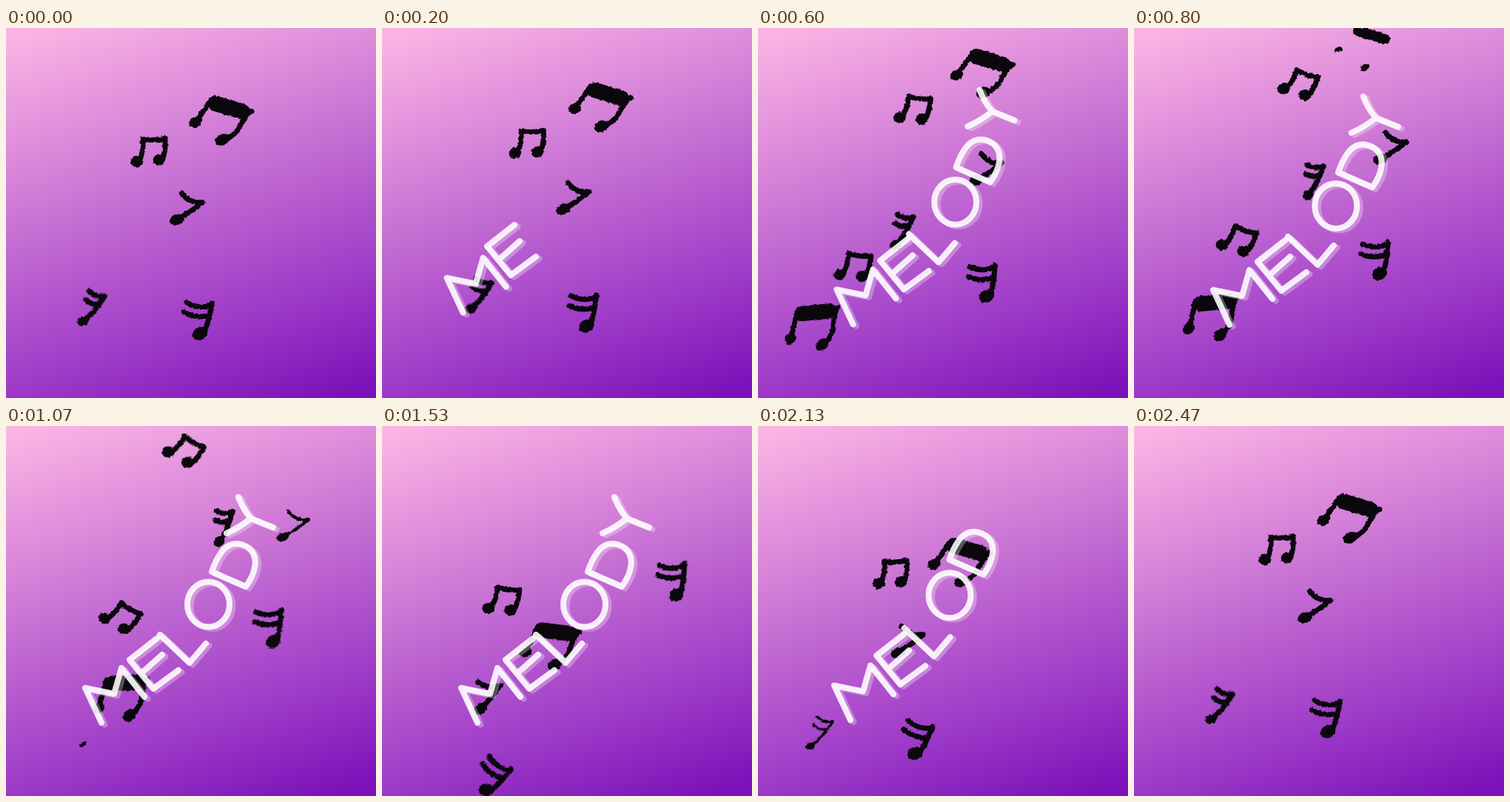
An HTML page for the animation above (2.54 s loop, 500 by 500 pixels).

```html
<!DOCTYPE html>
<html lang="en">
<head>
<meta charset="utf-8">
<title>Melody</title>
<style>
html, body { margin: 0; width: 100%; height: 100%; overflow: hidden; }
body { background: linear-gradient(162deg, #fbb4e4 2%, #dd8cdb 26%, #bb62d0 51%, #9e3bc8 74%, #7b12b9 97%); }
svg { display: block; width: 100%; height: 100%; }
path { fill: none; stroke-linecap: round; stroke-linejoin: round; }
#notes path { stroke: #0b080d; }
#notes ellipse { fill: #0b080d; }
#word path { stroke: #fff; stroke-width: 8; }
</style>
</head>
<body>
<svg viewBox="0 0 500 500" role="img" aria-label="MELODY">
  <filter id="rough" filterUnits="userSpaceOnUse" x="0" y="0" width="500" height="500" color-interpolation-filters="sRGB">
    <feTurbulence type="fractalNoise" baseFrequency="0.3" numOctaves="1" seed="4"/>
    <feDisplacementMap in="SourceGraphic" scale="4" xChannelSelector="R" yChannelSelector="G"/>
  </filter>
  <g id="notes" filter="url(#rough)"></g>
  <g id="word"></g>
</svg>
<script>
// time runs in steps of 1/15 s; the notes repeat every LAST steps
const STEP = 1000 / 15, LOOP = 2540, LAST = 37;
const FADE = 4.5, SETTLE = 8.4, PEN = 7;

const swing = (from, to, mid, span) => t => from + (to - from) / (1 + Math.exp((mid - t) / span));
const sway = (size, mid, span) => t => size * Math.exp(-(((t % LAST - mid) / span) ** 2));

// heads: [x, y, rx, ry]; stems: paths drawn with the pen; keys: [step, x, y] of the first head
const notes = [
  {
    born: 4.65, dies: 51.9, wear: 10, turn: swing(-23, 0, 22, 3),
    heads: [[0, 0, 9, 7], [36, 24, 10, 7.5]],
    stems: ['M3 -4Q12 -15 21 -29', 'M63 -15L76 -14', 'M72 -12Q62 0 58 10Q51 19 42 23'],
    beam: 'M27 -25L63 -14',
    keys: [[6, 16, 432], [12, 74, 406], [16, 125, 381], [23, 194, 305], [37, 256, 127], [43, 262, 94], [49, 276, 29]]
  },
  {
    born: 4.2, dies: 59, wear: 7, turn: sway(32, 16, 6),
    heads: [[0, 0, 8.5, 7.5], [30, -2, 8.5, 7.5]],
    stems: ['M4 -3Q9 -14 8 -30Q24 -27 38 -31Q39 -15 35 -4'],
    keys: [[6, 103, 377], [12, 119, 293], [16, 133, 260], [28, 152, 235], [37, 177, 180], [43, 183, 154], [49, 202, 82], [53, 219, 35]]
  },
  {
    born: 14.4, dies: 56.6, wear: 7, turn: swing(-17, 3, 27, 3),
    heads: [[0, 0, 10, 7]],
    stems: ['M5 -3L18 -12L34 -25Q16 -22 5 -36'],
    keys: [[16, 104, 430], [28, 158, 345], [37, 231, 259], [43, 261, 232], [49, 333, 177], [53, 374, 150]]
  },
  {
    born: 18, dies: 66.3, wear: 7, turn: swing(28, -10, 32, 3.5),
    heads: [[0, 0, 10.5, 8.5]],
    stems: ['M7 -4Q14 -20 18 -40', 'M18 -38Q0 -32 -16 -43', 'M14 -24Q-4 -20 -20 -30'],
    keys: [[23, 141, 492], [28, 171, 467], [37, 262, 413], [43, 288, 389], [53, 361, 291], [60, 398, 228], [65, 410, 161]]
  },
  {
    born: 28.6, dies: 59, wear: 7, turn: swing(1, -21, 46, 4),
    heads: [[0, 0, 8, 6.5]],
    stems: ['M4 -3Q14 -10 30 -33', 'M29 -33Q18 -31 9 -40', 'M20 -23Q12 -21 4 -29'],
    keys: [[28, 44, 462], [37, 104, 396], [43, 143, 352], [49, 235, 226], [53, 288, 156]]
  }
];

const letters = [
  'M129 401L107 354L146 362L156 327L187 366',
  'M204 287L167 316L199 355L233 330M183 334L211 309',
  'M208 282L248 320L270 294',
  'M245 241a28.5 30.5 0 1 0 57 0a28.5 30.5 0 1 0 -57 0Z',
  'M278 197L324 217C338 198 342 176 328 165C314 155 299 158 290 172Q283 182 278 197Z',
  'M314 96Q320 112 331 125M298 145Q314 138 331 125L361 137'
];

const make = (tag, parent, attrs = {}) => {
  const el = document.createElementNS('http://www.w3.org/2000/svg', tag);
  for (const k in attrs) el.setAttribute(k, attrs[k]);
  return parent.appendChild(el);
};
const show = (el, on) => el.style.display = on ? '' : 'none';

// smooth curve through the keys, straight on beyond the ends
function along(keys, t) {
  let i = 0;
  while (i < keys.length - 2 && t > keys[i + 1][0]) i++;
  const a = keys[i], b = keys[i + 1], p = keys[i - 1] || a, q = keys[i + 2] || b;
  const h = b[0] - a[0], u = (t - a[0]) / h, v = 1 - u;
  return [1, 2].map(k => {
    const m = (b[k] - p[k]) / (b[0] - p[0]) * h, n = (q[k] - a[k]) / (q[0] - a[0]) * h;
    if (u < 0) return a[k] + m * u;
    if (u > 1) return b[k] - n * v;
    return a[k] * v * v * (1 + 2 * u) + m * u * v * v + b[k] * u * u * (3 - 2 * u) - n * u * u * v;
  });
}

// two copies, since a note's life is longer than the loop
const layer = document.getElementById('notes');
const copies = notes.flatMap(note => [0, LAST].map(shift => {
  const g = make('g', layer);
  const line = (d, width) => ({ el: make('path', g, { d }), width });
  const lines = note.stems.map(d => line(d, PEN));
  if (note.beam) lines.push(line(note.beam, 3 * PEN));
  const heads = note.heads.map(([x, y, rx, ry]) =>
    ({ el: make('ellipse', g, { transform: `translate(${x} ${y}) rotate(-22)` }), rx, ry }));
  return { note, shift, g, lines, heads };
}));

const word = document.getElementById('word');
const glyphs = letters.map(d => {
  const g = make('g', word);
  make('path', g, { d, transform: 'translate(4.5 2.5)', opacity: 0.3 });
  make('path', g, { d, opacity: 0.88 });
  return g;
});

function drawNote({ note, shift, g, lines, heads }, n) {
  const t = n + shift, alive = t > note.born && t < note.dies;
  show(g, alive);
  if (!alive) return;
  const [x, y] = along(note.keys, t);
  g.setAttribute('transform', `translate(${x} ${y}) rotate(${note.turn(t)})`);
  // strokes thin away at both ends of a note's life
  const thin = note.wear * Math.max(0, 1 - Math.min(t - note.born, note.dies - t) / FADE);
  for (const { el, width } of lines) {
    show(el, width > 2 * thin);
    el.setAttribute('stroke-width', Math.max(0, width - 2 * thin));
  }
  for (const { el, rx, ry } of heads) {
    el.setAttribute('rx', Math.max(0, rx - thin));
    el.setAttribute('ry', Math.max(0, ry - thin));
  }
}

// letters drop in one step apart and lift off in reverse order
function drawLetter(g, i, n) {
  const age = n - (i + 2), left = LAST - i - n;
  show(g, age >= 0 && left > 0);
  const s = Math.max(0, 1 - Math.min(age, left) / SETTLE) ** 2;
  g.setAttribute('transform', `translate(${-25 * s} ${-21 * s})`);
}

function draw(ms) {
  const n = Math.min(LAST, Math.floor((ms % LOOP + 4) / STEP)) % LAST;
  copies.forEach(c => drawNote(c, n));
  glyphs.forEach((g, i) => drawLetter(g, i, n));
}

let start;
function tick(now) {
  start ??= now;
  draw(now - start);
  requestAnimationFrame(tick);
}
draw(0);
requestAnimationFrame(tick);
</script>
</body>
</html>
```
